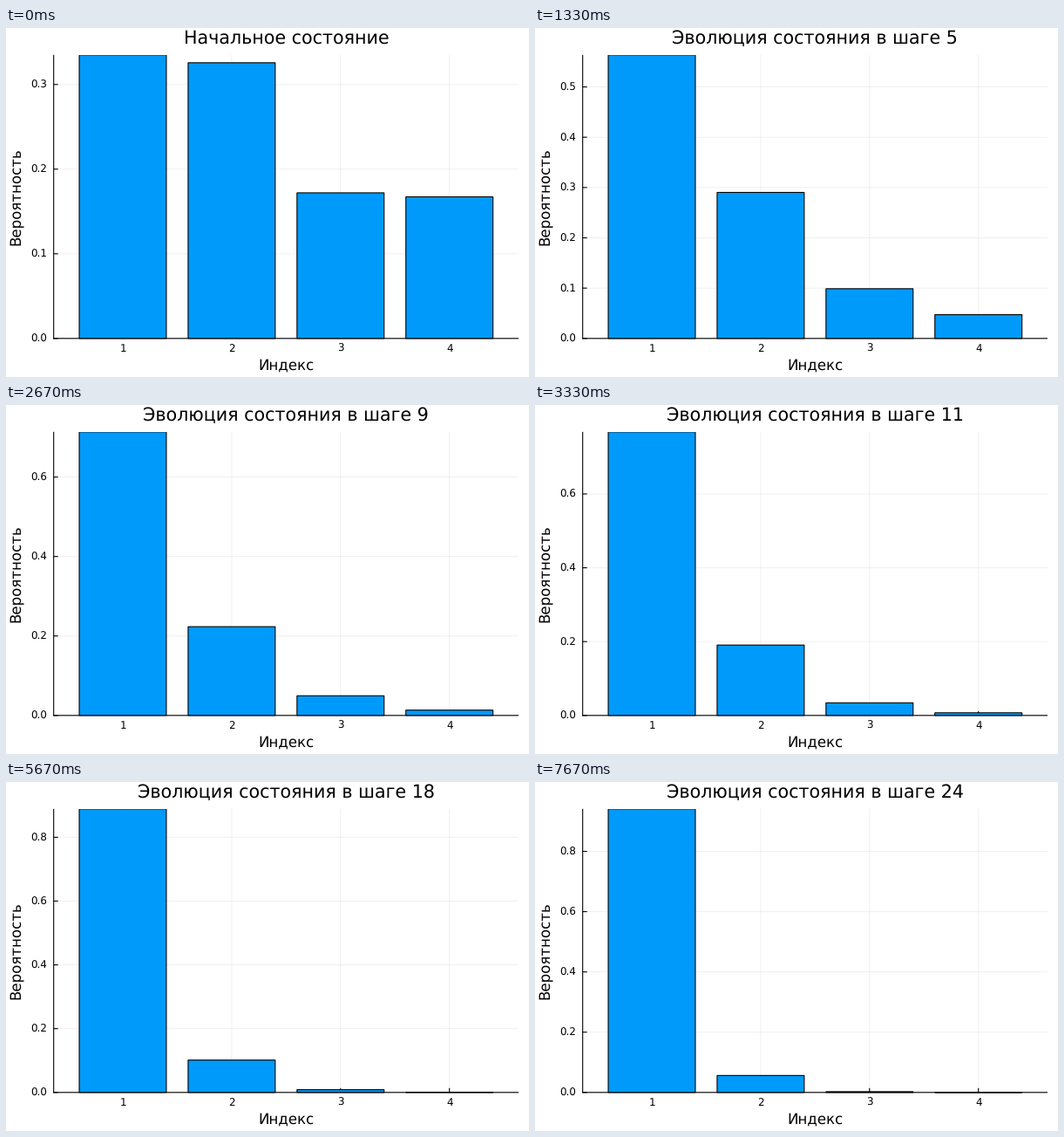
Write a matplotlib script that moves like this. It is 600 px wide and 400 px high and loops after 8 s.

```python
import matplotlib.pyplot as plt
from matplotlib.animation import ArtistAnimation
from matplotlib.patches import Rectangle

W, H, DPI = 600, 400, 100
STEPS, LOOP_MS, TICK_MS = 24, 8000, 20
LEFT, RIGHT, TOP, BASE = 54.7, 588.0, 30.8, 355.8
MID_X, MID_Y = (LEFT + RIGHT) / 2, (TOP + BASE) / 2
SPACING = (RIGHT - LEFT) / (3.8 * 1.06 ** 2)
BAR_W = 0.8 * SPACING
TICK = 5
BLUE = "#009AFA"
START = (0.335, 0.3257, 0.172, 0.1673)
DECAY = 0.9

plt.rcParams.update({
    "font.family": "DejaVu Sans",
    "text.hinting": "none",
    "path.snap": False,
    "lines.solid_capstyle": "butt",
})

fig = plt.figure(figsize=(W / DPI, H / DPI), dpi=DPI, facecolor="white")
ax = fig.add_axes([0, 0, 1, 1])
ax.set_xlim(0, W)
ax.set_ylim(H, 0)
ax.set_autoscale_on(False)
ax.axis("off")
plot_area = Rectangle((LEFT, TOP), RIGHT - LEFT, BASE - TOP + 1,
                      transform=ax.transData)


def pt(px):
    return px * 72 / DPI


def line(x0, y0, x1, y1, width=1.1, alpha=1.0, z=2):
    return ax.plot([x0, x1], [y0, y1], color="black", lw=pt(width),
                   alpha=alpha, zorder=z)[0]


def label(x, y, text, size, ha="center", rotation=0):
    return ax.text(x, y, text, fontsize=pt(size), ha=ha, va="baseline",
                   rotation=rotation, rotation_mode="anchor", zorder=5)


def bar_x(i):
    return MID_X + (i - 1.5) * SPACING


def probabilities(step):
    # The total held by level j and above shrinks by DECAY**j each step.
    tails = [sum(START[j:]) * DECAY ** (j * step) for j in range(4)]
    tails[0] = 1.0
    return [a - b for a, b in zip(tails, tails[1:] + [0.0])]


def draw_fixed():
    line(LEFT, TOP, LEFT, BASE + 0.5)
    line(LEFT - 0.5, BASE, RIGHT, BASE)
    for i in range(4):
        x = bar_x(i)
        line(x, TOP, x, BASE, 1, 0.06, 1)
        line(x, BASE, x, BASE - TICK)
        label(x, 371, str(i + 1), 11.9)
    label(MID_X, 392, "Индекс", 16.6)
    label(16, MID_Y - 0.6, "Вероятность", 16.6, rotation=90)


def draw_step(step):
    probs = probabilities(step)
    peak = max(probs)
    scale = (BASE - TOP) / peak
    title = f"Эволюция состояния в шаге {step + 1}" if step else "Начальное состояние"
    artists = [label(MID_X, 18, title, 20.7)]

    tick_step = 0.1 if peak < 0.7 else 0.2
    for i in range(int(peak / tick_step) + 1):
        value = i * tick_step
        y = BASE - value * scale
        artists += [line(LEFT, y, RIGHT, y, 1, 0.06, 1),
                    line(LEFT, y, LEFT + TICK, y),
                    label(47, y + 4.3, f"{value:.1f}", 11.9, ha="right")]

    for i, p in enumerate(probs):
        bar = Rectangle((bar_x(i) - BAR_W / 2, BASE - p * scale), BAR_W, p * scale,
                        facecolor=BLUE, edgecolor="black", lw=pt(1.1),
                        joinstyle="miter", zorder=3)
        artists.append(ax.add_patch(bar))
        bar.set_clip_path(plot_area)
    return artists


def step_at(ms):
    # Step changes fall between ticks, so each snaps to the tick before it.
    return (ms + 15) * STEPS // LOOP_MS


draw_fixed()
scenes = [draw_step(step) for step in range(STEPS)]
anim = ArtistAnimation(fig, [scenes[step_at(ms)] for ms in range(0, LOOP_MS, TICK_MS)],
                       interval=TICK_MS, repeat=True, repeat_delay=0)
plt.show()
```
